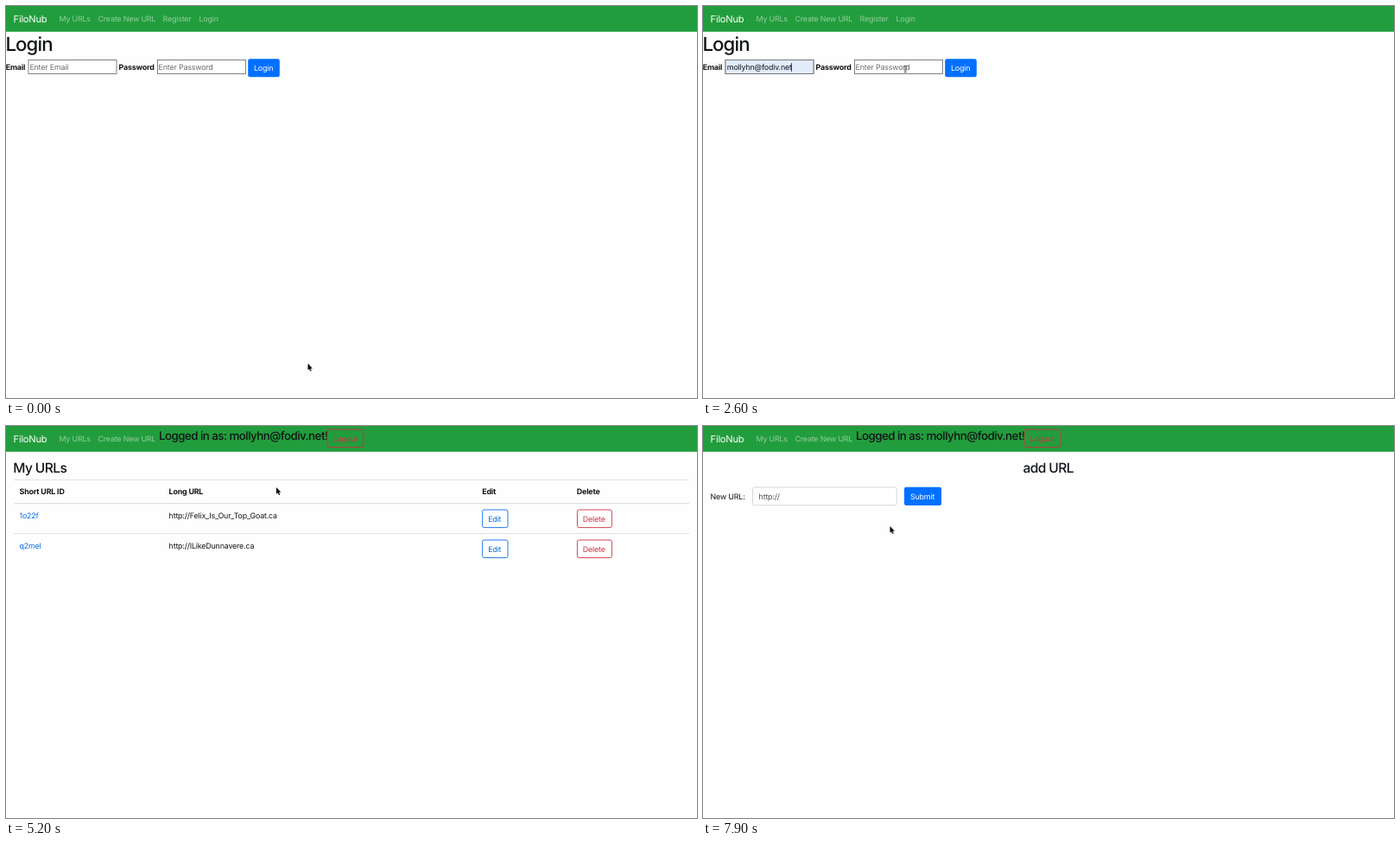
Write an HTML page that moves like this. It is 800x454 px and loops after 8000 ms.

```html
<!DOCTYPE html>
<html lang="en">
<head>
<meta charset="utf-8">
<title>FiloNub</title>
<style>
  html, body { margin: 0; width: 100%; height: 100%; overflow: hidden; background: #fefefe; }
  svg { display: block; width: 100%; height: 100%; }
  text {
    font: 400 8.89px Inter, Roboto, "Liberation Sans", sans-serif;
    letter-spacing: -.02em; fill: #111417; white-space: pre;
    text-rendering: geometricPrecision;
  }
  .bold { font-weight: 700; }
  .h1 { font-size: 22.2px; font-weight: 500; letter-spacing: -.04em; }
  .h3 { font-size: 15.55px; font-weight: 500; letter-spacing: -.037em; }
  .h4 { font-size: 13.33px; font-weight: 500; letter-spacing: -.04em; }
  .brand { font-size: 11.1px; fill: #fff; }
  .nav { fill: #fff; fill-opacity: .5; }
  .hint { fill: #686b6e; }
  .white { fill: #fff; }
  .blue { fill: #0a6be0; }
  .red { fill: #cd3240; }
  .menu text { font-size: 7.2px; letter-spacing: 0; }
  .status text { font-size: 6.8px; letter-spacing: -.01em; fill: #8c8c8c; }
  .field { fill: #fff; stroke: #747474; stroke-width: .9; }
  .filled { fill: #e1ebfa; }
  .solid { fill: #0070ff; }
  .outline { fill: none; stroke-width: .9; }
  .outline.b { stroke: #0a6fe8; }
  .outline.r { stroke: #cd3240; }
  .rule { stroke: #dee1e4; }
  .caret { stroke: #111; stroke-width: .8; }
  .menu .card { fill: #fff; stroke: #d8d8d8; stroke-width: .5; filter: drop-shadow(0 1px 1px #0005); }

  /* Everything shares one 8 s clock; 1.25% is 100 ms. */
  .a { animation: 8s step-end infinite; }

  .login { animation-name: login; }
  .user { animation-name: user; }
  .list { animation-name: list; }
  .add { animation-name: add; }
  @keyframes login { 0% { opacity: 1 } 51.25%, 100% { opacity: 0 } }
  @keyframes user { 0% { opacity: 0 } 51.25%, 100% { opacity: 1 } }
  @keyframes list { 0% { opacity: 0 } 51.25% { opacity: 1 } 83.75%, 100% { opacity: 0 } }
  @keyframes add { 0% { opacity: 0 } 83.75%, 100% { opacity: 1 } }

  .menu { animation-name: menu; }
  .pick { animation-name: pick; }
  .mailhint { animation-name: mailhint; }
  .mail { animation-name: mail; }
  .caret1 { animation-name: caret1; }
  .caret2 { animation-name: caret2; }
  @keyframes menu { 0% { opacity: 0 } 13.75% { opacity: 1 } 26.25%, 100% { opacity: 0 } }
  @keyframes pick { 0% { opacity: 0 } 21.25%, 100% { opacity: 1 } }
  @keyframes mailhint { 0% { opacity: 1 } 23.75%, 100% { opacity: 0 } }
  @keyframes mail { 0% { opacity: 0 } 23.75%, 100% { opacity: 1 } }
  @keyframes caret1 { 0% { opacity: 0 } 11.25% { opacity: 1 } 17.5%, 100% { opacity: 0 } }
  @keyframes caret2 { 0% { opacity: 0 } 26.25% { opacity: 1 } 33.75%, 100% { opacity: 0 } }

  .passhint { animation-name: passhint; }
  .dot { opacity: 0; animation-name: dot; animation-delay: calc(var(--n) * .1s); }
  .caret3 { animation-name: caret3; }
  @keyframes passhint { 0% { opacity: 1 } 37.5%, 100% { opacity: 0 } }
  @keyframes dot { 0% { opacity: 0 } 37.5%, 100% { opacity: 1 } }
  @keyframes caret3 {
    0% { opacity: 0; transform: none }
    33.75% { opacity: 1; transform: none }
    36.25% { opacity: 1; transform: none; animation-timing-function: steps(4, end) }
    41.25%, 100% { opacity: 1; transform: translateX(16px) }
  }

  .press { animation-name: press; }
  .link { animation-name: link; }
  .status { animation-name: status; }
  @keyframes press { 0% { fill: #0070ff } 45%, 100% { fill: #005fd3 } }
  @keyframes link { 0% { fill-opacity: .5 } 77.5% { fill-opacity: .75 } 83.75%, 100% { fill-opacity: .5 } }
  @keyframes status {
    0% { opacity: 0 }
    78.75% { opacity: .3 }
    80% { opacity: .65 }
    81.25% { opacity: 1 }
    83.75% { opacity: .5 }
    85%, 100% { opacity: 0 }
  }

  .mouse { animation-name: mouse; }
  .arrow { animation-name: arrow; }
  .beam { animation-name: beam; }
  .hand { animation-name: hand; }
  @keyframes mouse {
    0% { transform: translate(349.5px, 414px) }
    1.25% { transform: translate(250px, 235px) }
    2.5% { transform: translate(105px, 72px) }
    18.75% { transform: translate(105px, 72px); animation-timing-function: steps(2, end) }
    21.25% { transform: translate(106.5px, 87px) }
    27.5% { transform: translate(106.5px, 87px); animation-timing-function: steps(3, end) }
    31.25% { transform: translate(234.3px, 73px) }
    42.5% { transform: translate(234.3px, 73px); animation-timing-function: steps(3, end) }
    46.25% { transform: translate(310.5px, 71.2px) }
    51.25% { transform: translate(313px, 71px) }
    72.5% { transform: translate(313px, 71px); animation-timing-function: steps(5, end) }
    78.75% { transform: translate(131.8px, 18.2px) }
    83.75% { transform: translate(134px, 18px); animation-timing-function: steps(3, end) }
    87.5%, 100% { transform: translate(216.5px, 116px) }
  }
  @keyframes arrow {
    0% { opacity: 1 } 2.5% { opacity: 0 } 20% { opacity: 1 } 30% { opacity: 0 }
    42.5% { opacity: 1 } 45% { opacity: 0 } 51.25% { opacity: 1 } 77.5% { opacity: 0 }
    83.75%, 100% { opacity: 1 }
  }
  @keyframes beam {
    0% { opacity: 0 } 2.5% { opacity: 1 } 20% { opacity: 0 } 30% { opacity: 1 }
    37.5%, 100% { opacity: 0 }
  }
  @keyframes hand {
    0% { opacity: 0 } 45% { opacity: 1 } 51.25% { opacity: 0 } 77.5% { opacity: 1 }
    83.75%, 100% { opacity: 0 }
  }
</style>
</head>
<body>
<svg viewBox="0 0 800 454" preserveAspectRatio="none">
  <rect width="800" height="454" fill="#fefefe"/>
  <rect width="800" height="29.8" fill="#229d3d"/>
  <text class="brand" x="8.6" y="18.6">FiloNub</text>
  <text class="nav" x="61.5" y="17.9">My URLs</text>
  <text class="nav link a" x="106.5" y="17.9">Create New URL</text>

  <g class="login a">
    <text class="nav" x="181.5" y="17.9">Register</text>
    <text class="nav" x="223.5" y="17.9">Login</text>
    <text class="h1" x="-.6" y="52">Login</text>

    <text class="bold" x="-.3" y="73.9">Email</text>
    <rect class="field" x="26" y="62.5" width="102" height="16"/>
    <text class="hint mailhint a" x="27.4" y="73.9">Enter Email</text>
    <g class="mail a">
      <rect class="field filled" x="26" y="62.5" width="102" height="16"/>
      <text x="27.8" y="73.9">mollyhn@fodiv.net</text>
    </g>
    <path class="caret caret1 a" d="M28.2 66v10"/>
    <path class="caret caret2 a" d="M102.4 66v10"/>

    <text class="bold" x="130.6" y="73.9">Password</text>
    <rect class="field" x="175.5" y="62.5" width="102" height="16"/>
    <text class="hint passhint a" x="176.6" y="73.9">Enter Password</text>
    <g fill="#111">
      <circle class="dot a" style="--n:0" cx="179.4" cy="71" r="1.1"/>
      <circle class="dot a" style="--n:1" cx="183.4" cy="71" r="1.1"/>
      <circle class="dot a" style="--n:2" cx="187.4" cy="71" r="1.1"/>
      <circle class="dot a" style="--n:3" cx="191.4" cy="71" r="1.1"/>
    </g>
    <path class="caret caret3 a" d="M177.6 66v10"/>

    <rect class="press a" x="280.2" y="61.2" width="36.6" height="21" rx="2.2"/>
    <text class="white" x="287" y="75.1">Login</text>

    <g class="menu a">
      <path d="M71 86l6-6 6 6z" fill="#fff" stroke="#eee" stroke-width=".6"/>
      <rect class="card" x="65" y="86" width="93.6" height="122.2" rx="1.2"/>
      <rect class="pick a" x="65" y="86" width="93.6" height="20" fill="#e1e1e1"/>
      <text x="71.4" y="98.9">mollyhn@fodiv.net</text>
      <text x="71.4" y="118.9">e@u.com</text>
      <text x="71.4" y="138.9">titus@fodiv.net</text>
      <text x="71.4" y="158.9">olivercantel@uqi.com</text>
      <text x="71.4" y="178.9">e@n.com</text>
      <text x="71.4" y="198.9">mollyhn@fodiv.com</text>
    </g>
  </g>

  <g class="user a">
    <text class="h4" x="177" y="16.3">Logged in as: mollyhn@fodiv.net!</text>
    <rect class="outline r" x="372" y="4" width="42" height="20.6" rx="2.2"/>
    <text class="red" x="378.6" y="17.6">Logout</text>
  </g>

  <g class="list a">
    <text class="h3" x="8.2" y="54">My URLs</text>
    <path class="rule" d="M9 62.4H791M9 124.6H791"/>
    <path class="rule" d="M9 89.6H791" stroke-width="1.3"/>
    <g class="bold">
      <text class="bold" x="15.5" y="79">Short URL ID</text>
      <text class="bold" x="188.6" y="79">Long URL</text>
      <text class="bold" x="551.2" y="79">Edit</text>
      <text class="bold" x="660.8" y="79">Delete</text>
    </g>
    <text class="blue" x="15.5" y="107">1o22f</text>
    <text x="188.6" y="107">http://Felix_Is_Our_Top_Goat.ca</text>
    <text class="blue" x="15.5" y="142">q2mel</text>
    <text x="188.6" y="142">http://ILikeDunnavere.ca</text>
    <g id="actions">
      <rect class="outline b" x="551.6" y="97" width="29.4" height="20.6" rx="2.2"/>
      <text class="blue" x="558.2" y="110.7">Edit</text>
      <rect class="outline r" x="661.4" y="97" width="40" height="20.6" rx="2.2"/>
      <text class="red" x="667.8" y="110.7">Delete</text>
    </g>
    <use href="#actions" y="35"/>
  </g>

  <g class="add a">
    <text class="h3" x="399.7" y="54" text-anchor="middle">add URL</text>
    <text x="8.6" y="84.7">New URL:</text>
    <rect x="57.6" y="71" width="166.6" height="20.8" rx="2.2" fill="#fff" stroke="#ced3d8" stroke-width=".9"/>
    <text x="64.6" y="84.7" style="fill:#495057">http://</text>
    <rect class="solid" x="233" y="70.8" width="43" height="21.2" rx="2.2"/>
    <text class="white" x="240" y="84.7">Submit</text>
  </g>

  <g class="status a">
    <path d="M0 443H81q2 0 2 2V454H0z" fill="#dadada"/>
    <text x="2.6" y="451">localhost:3000/page/new</text>
  </g>

  <g class="mouse a">
    <path class="arrow a" d="M0 0V7.8L1.7 6.2 2.9 9 4.2 8.5 3 5.8H5.3z" fill="#000" stroke="#fff" stroke-width=".8" paint-order="stroke"/>
    <path class="beam a" d="M-1.6-3.8Q0-3.8 0-2.8Q0-3.8 1.6-3.8M0-2.8V3M-1.6 4Q0 4 0 3Q0 4 1.6 4M-.8 1.2H.8" fill="none" stroke="#222" stroke-width=".8"/>
    <path class="hand a" d="M1.6.2Q2.5.2 2.5 1.2V3.6L5.6 4.2Q6.6 4.5 6.4 5.7L5.7 8.8H2.1L-.4 5.7Q-.9 4.7 0 4.6L.8 5.3V1.2Q.8.2 1.6.2z" fill="#fff" stroke="#111" stroke-width=".75"/>
  </g>
</svg>
</body>
</html>
```
